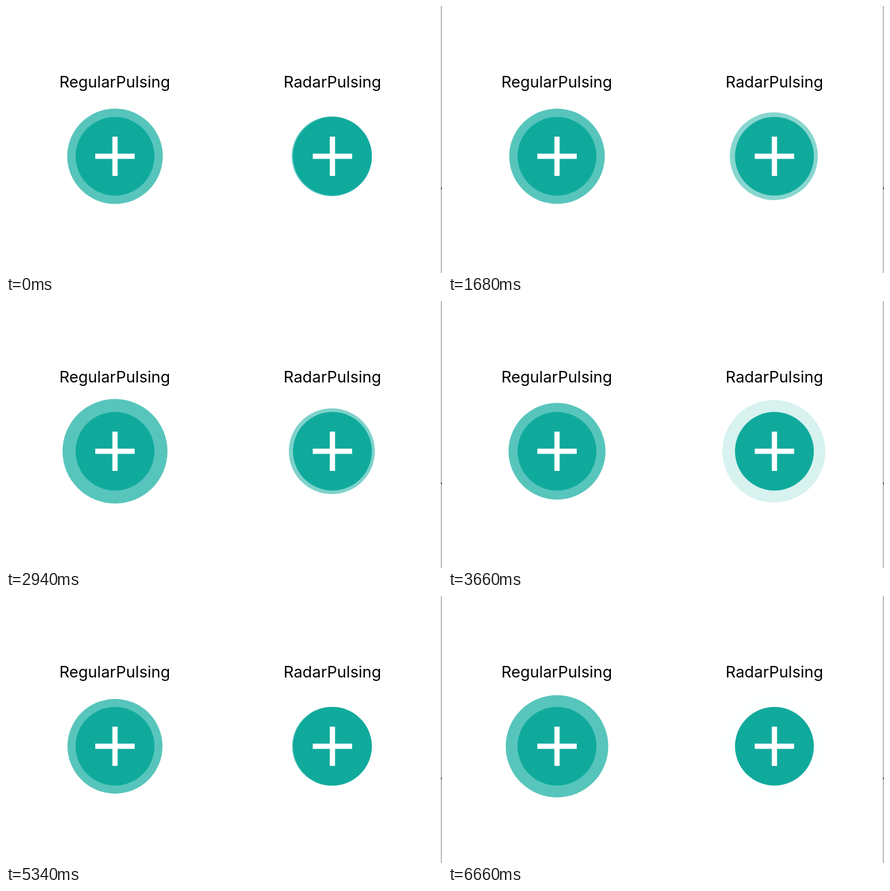
These frames come from a looping animation (752 px wide and 462 px high, 6720 ms). An HTML page:

```html
<!DOCTYPE html>
<html lang="en">
<head>
<meta charset="utf-8">
<title>Pulsing buttons</title>
<style>
  html, body { margin: 0; width: 100%; height: 100%; overflow: hidden; background: #fff; }
  svg { display: block; width: 752px; height: 462px; }
  text { font: 400 27.1px Inter, "Liberation Sans", sans-serif; text-anchor: middle; }
  circle { fill: #10aa9d; }
  .pulse { fill: #11ad9f; }
  .plus { stroke: #fff; stroke-width: 9; }
</style>
</head>
<body>
<svg viewBox="0 0 752 462">
  <defs>
    <g id="button">
      <circle r="68"/>
      <path class="plus" d="M-34 0H34M0 -34V34"/>
    </g>
  </defs>
  <text x="187.5" y="141">RegularPulsing</text>
  <text x="563" y="141">RadarPulsing</text>
  <circle id="regular" class="pulse" cx="188" cy="260" r="82" opacity=".7"/>
  <circle id="radar" class="pulse" cx="562" cy="260" r="68" opacity=".7"/>
  <use href="#button" x="188" y="260"/>
  <use href="#button" x="563" y="260"/>
  <rect x="750" width="1.5" height="462" fill="#a4a4a4"/>
  <rect x="750" y="314" width="2" height="3" fill="#555"/>
</svg>
<script>
  const LOOP = 6720, STEP = 60, RADIUS = 68, ALPHA = 0.7;
  const SWING = 896;          // one way of the regular pulse
  const SWING_PEAK = 838;     // first moment at full size
  const SWEEP = LOOP / 5;     // one radar wave
  const SWEEP_LEAD = 54;      // wave already under way at time 0
  const regular = document.getElementById('regular');
  const radar = document.getElementById('radar');

  function draw(t) {
    // linear swing between scales 1.2 and 1.4
    const phase = (t - SWING_PEAK + 2 * SWING) % (2 * SWING) / SWING;
    regular.setAttribute('r', RADIUS * (1.2 + 0.2 * Math.abs(1 - phase)));

    // linear growth to scale 1.4 while fading out
    const p = (t + SWEEP_LEAD) % SWEEP / SWEEP;
    radar.setAttribute('r', RADIUS * (1 + 0.4 * p));
    radar.setAttribute('opacity', ALPHA * (1 - p));
  }

  const start = performance.now();
  function tick() {
    const t = (performance.now() - start) % LOOP;
    draw(Math.floor(t / STEP) * STEP);
    requestAnimationFrame(tick);
  }
  tick();
</script>
</body>
</html>
```
